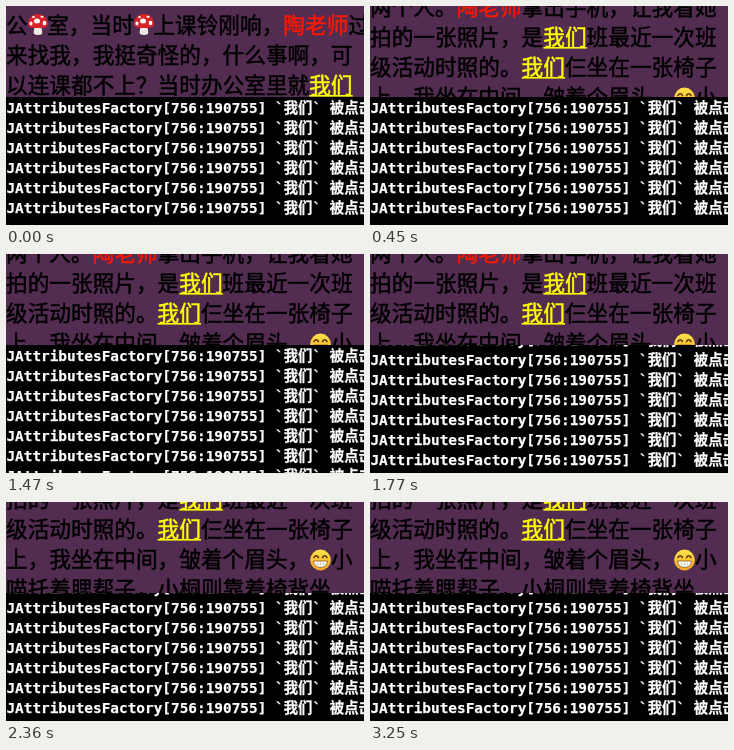
An HTML page that plays this animation: 358 by 220 pixels, repeating every 3660 ms.

```html
<!DOCTYPE html>
<html lang="zh-CN">
<head>
<meta charset="utf-8">
<title>Attributed text taps</title>
<style>
  html, body { margin: 0; width: 100%; height: 100%; overflow: hidden; background: #000; }
  svg { display: block; }
  .stage { width: 358px; height: 220px; }
  text { white-space: pre; fill: currentColor; stroke: currentColor; }
  tspan { fill: currentColor; stroke: currentColor; }

  .story { font: 500 21.67px "Noto Sans CJK SC", "Noto Sans CJK", sans-serif; color: #000; }
  .story text { stroke-width: .5px; }
  .name { color: #fb1800; }
  .link { color: #ff0; }
  .log { font: 700 14.4px "DejaVu Sans Mono", "Noto Sans CJK SC", "Noto Sans CJK", monospace; color: #fff; }
  #row { stroke-width: .25px; }

  .story, .log, .new { animation: 3660ms step-end infinite; }
  .story { animation-name: read; }
  .log { animation-name: follow; }
  .new { animation-name: append; }

  /* Two flicks of the story, each settling in hard steps */
  @keyframes read {
    0% { transform: translateY(0); }
    8.197% { transform: translateY(-92px); }
    12.295% { transform: translateY(-108px); }
    16.12% { transform: translateY(-109px); }
    20.219% { transform: translateY(-110px); }
    60.383% { transform: translateY(-130px); }
    64.481%, 100% { transform: translateY(-142px); }
  }
  /* A tap adds a row, then the console scrolls to it */
  @keyframes follow {
    0% { transform: translateY(0); }
    44.262%, 100% { transform: translateY(-16px); }
  }
  @keyframes append {
    0% { opacity: 0; }
    40.164%, 100% { opacity: 1; }
  }
</style>
</head>
<body>
<svg class="stage" viewBox="0 0 358 220">
  <defs>
    <linearGradient id="skin" x2="0" y2="1">
      <stop offset="0" stop-color="#ffe24a"/>
      <stop offset="1" stop-color="#f5a623"/>
    </linearGradient>
    <g id="mushroom">
      <path d="M-3.5 0 C-3 4 -5 7 -4 9.5 Q0 11.5 4 9.5 C5 7 3 4 3.5 0Z" fill="#f0e9e4"/>
      <path d="M-10 0 C-10 -7 -5 -10.5 0 -10.5 S10 -7 10 0 C10 3 5 3.5 0 3.5 S-10 3 -10 0Z" fill="#d8232a"/>
      <g fill="#fff">
        <ellipse cx="-1" cy="-3.5" rx="3" ry="2.5"/>
        <ellipse cx="-7" cy="-1" rx="1.5" ry="2"/>
        <ellipse cx="6.5" cy="-1.5" rx="1.8" ry="2.2"/>
        <ellipse cx="4" cy="-7.8" rx="1.6" ry="1"/>
        <ellipse cx="-4.5" cy="-7.5" rx="1.4" ry="1"/>
      </g>
    </g>
    <g id="grin">
      <circle r="10.4" fill="url(#skin)"/>
      <path d="M-6.5 -2.5 Q-4.3 -6 -2 -2.5 M2 -2.5 Q4.3 -6 6.5 -2.5" fill="none" stroke="#5b3512" stroke-width="1.5" stroke-linecap="round"/>
      <path d="M-7 1 H7 Q6.5 7.5 0 7.5 T-7 1Z" fill="#fff" stroke="#8a5a20" stroke-width=".8"/>
      <path d="M-6 4 H6 M-3 1.2 V7 M0 1.2 V7.4 M3 1.2 V7" stroke="#c4b7a5" stroke-width=".5"/>
    </g>
    <rect id="line" width="43.3" height="1.6" fill="#ff0"/>
    <text id="row" x=".4">JAttributesFactory[756:190755] `我们` 被点击</text>
  </defs>

  <!-- &#xFF0C; and &#xFF1F; are the full-width comma and question mark -->
  <svg width="358" height="91">
    <rect width="358" height="91" fill="#532c51"/>
    <g class="story">
      <text y="27">公<tspan x="41.2">室&#xFF0C;当时</tspan><tspan x="147.4">上课铃刚响&#xFF0C;</tspan><tspan class="name">陶老师</tspan>过</text>
      <use href="#mushroom" x="32" y="18.5"/>
      <use href="#mushroom" x="138" y="18.5"/>
      <text y="57">来找我&#xFF0C;我挺奇怪的&#xFF0C;什么事啊&#xFF0C;可</text>
      <text y="87">以连课都不上&#xFF1F;当时办公室里就<tspan class="link">我们</tspan></text>
      <use href="#line" x="303.4" y="89"/>
      <text y="117">两个人。<tspan class="name">陶老师</tspan>拿出手机&#xFF0C;让我看她</text>
      <text y="147">拍的一张照片&#xFF0C;是<tspan class="link">我们</tspan>班最近一次班</text>
      <use href="#line" x="173.4" y="149"/>
      <text y="177">级活动时照的。<tspan class="link">我们</tspan>仨坐在一张椅子</text>
      <use href="#line" x="151.7" y="179"/>
      <text y="207">上&#xFF0C;我坐在中间&#xFF0C;皱着个眉头&#xFF0C;<tspan x="325">小</tspan></text>
      <use href="#grin" x="314.5" y="200"/>
      <text y="237">喵托着腮帮子&#xFF0C;小桐则靠着椅背坐</text>
    </g>
  </svg>

  <svg y="91" width="358" height="128">
    <rect width="358" height="128" fill="#000"/>
    <g class="log">
      <use href="#row" y="-4"/>
      <use href="#row" y="16"/>
      <use href="#row" y="36"/>
      <use href="#row" y="56"/>
      <use href="#row" y="76"/>
      <use href="#row" y="96"/>
      <use href="#row" y="116"/>
      <use class="new" href="#row" y="136"/>
    </g>
  </svg>
  <rect y="219" width="358" height="1" fill="#eee"/>
</svg>
</body>
</html>
```
